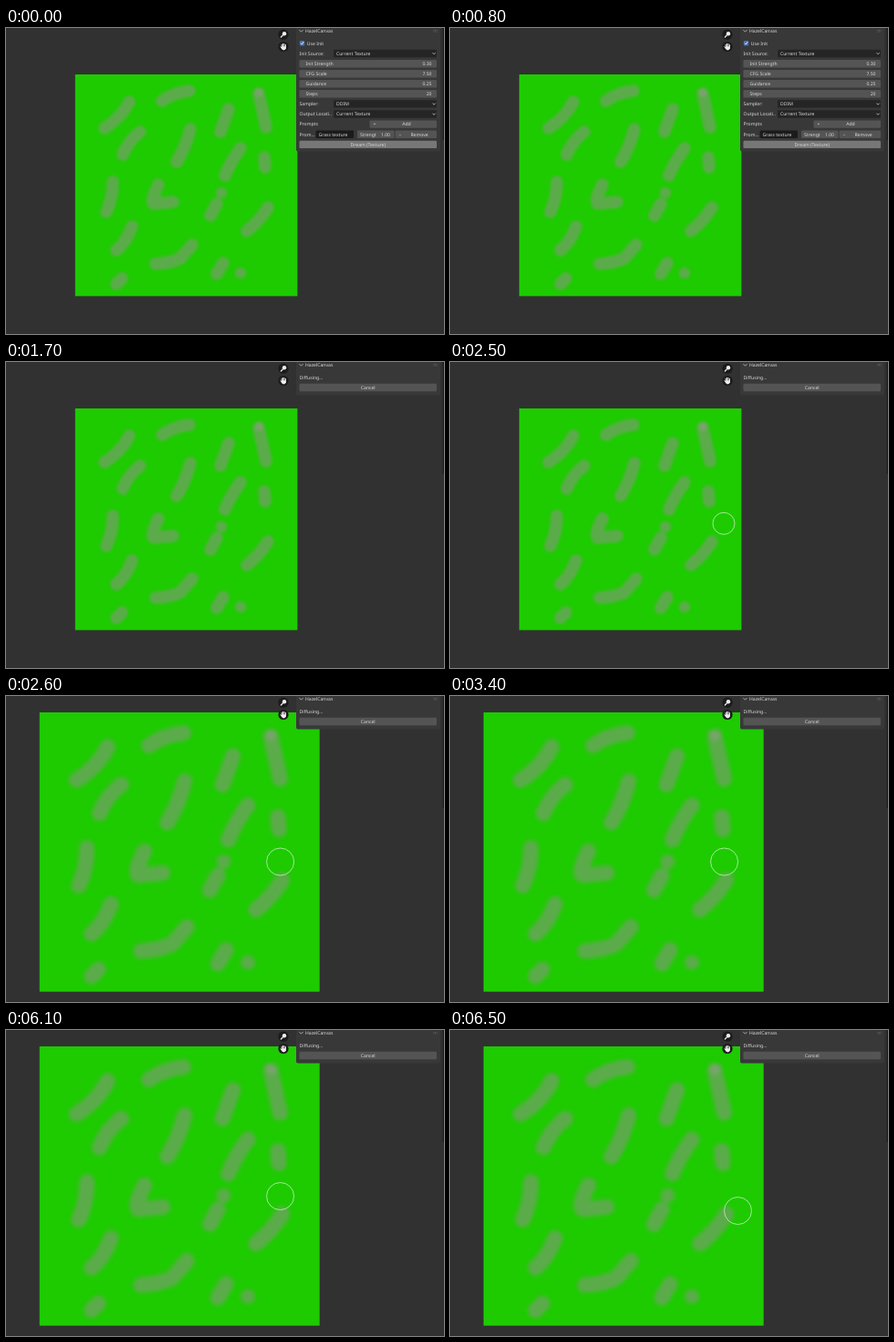
Recreate the animation shown at these times as an HTML page. Size 480x336 px, loop 8000 ms.

```html
<!DOCTYPE html>
<html lang="en">
<head>
<meta charset="utf-8">
<title>Texture panel</title>
<style>
  html, body { margin: 0; width: 100%; height: 100%; overflow: hidden; background: #313131; }
  svg { display: block; width: 480px; height: 336px; }
  text { font: 5.1px "Noto Sans", "Open Sans", sans-serif; fill: #dcdcdc; text-rendering: geometricPrecision; }
  .line { fill: none; stroke: #d0d0d0; stroke-width: .8; }
</style>
</head>
<body>
<svg viewBox="0 0 480 336">
  <defs>
    <filter id="soft" filterUnits="userSpaceOnUse" x="70" y="45" width="256" height="256">
      <feGaussianBlur stdDeviation="1.7"/>
    </filter>
  </defs>
  <rect width="480" height="336" fill="#313131"/>

  <g id="texture">
    <rect x="75.8" y="51" width="243.6" height="243.4" fill="#1dcb00"/>
    <g filter="url(#soft)" fill="none" stroke="#5cab4b" stroke-width="13.5" stroke-linecap="round" stroke-linejoin="round">
      <path d="M108 110Q127 98 135 81M171 80Q183 71 201 69M277 72L285 109M244 89L235 114
        M147 114Q134 124 128 139M202 111Q197 131 187 147M257 132Q246 147 240 162M283 142L284 153
        M117 169Q117 187 110 202M167 172Q158 190 162 193L183 191M231 193L224 206
        M287 197Q278 212 264 223M138 218Q132 235 121 244M164 259Q180 258 191 253L204 238
        M238 258L231 270M127 275L121 281"/>
      <path d="M236 181h.01M257 269h.01" stroke-width="12.5"/>
      <path d="M277 71h.01" stroke="#78a46c" stroke-width="9"/>
    </g>
  </g>

  <circle id="brush" fill="none" stroke="#c9ecc0" stroke-width=".8"/>

  <g id="tools">
    <circle cx="304" cy="7.2" r="5.6" fill="#1b1b1b"/>
    <circle cx="305" cy="6.2" r="2.2" fill="#eee"/>
    <path d="M303.3 8L301.3 10" stroke="#eee" stroke-width="1.2" stroke-linecap="round"/>
    <circle cx="304" cy="20.5" r="5.6" fill="#1b1b1b"/>
    <path d="M302.2 21V18.2M303.6 20.5V17.3M305 20.5V17.5M306.4 21V18.5M301 20.7L303 23.3" stroke="#eee" stroke-width="1" stroke-linecap="round"/>
    <path d="M301.9 20.3H306.9V22.3Q306.3 24.4 304.3 24.4Q302.8 24.2 301.9 22.5Z" fill="#eee"/>
  </g>

  <path d="M479.3 0V123" stroke="#202020" stroke-width="1.4"/>
  <g id="settings"></g>
  <g id="progress"></g>
</svg>

<script>
const $ = id => document.getElementById(id);
const LOOP = 8000;
const GRAY = '#545454', HOVER = '#777777', BLUE = '#4772b3', DARK = '#252525';

const text = (x, y, label, anchor = 'start') =>
  `<text x="${x}" y="${y + 1.8}" text-anchor="${anchor}">${label}</text>`;
const box = (x, y, right, fill, id = '') =>
  `<rect id="${id}" x="${x}" y="${y - 4.2}" width="${right - x}" height="8.4" rx="1.2" fill="${fill}"/>`;
const button = (x, y, right, label, id) =>
  box(x, y, right, GRAY, id) + text((x + right) / 2, y, label, 'middle');
const slider = (y, label, value) =>
  box(321.5, y, 472, GRAY) + text(328.5, y, label) + text(466.5, y, value, 'end');
const menu = (y, label, value) =>
  text(321.5, y, label) + box(359, y, 472, DARK) + text(362, y, value) +
  `<path class="line" d="M467.5 ${y - .8}l1.6 1.6 1.6-1.6"/>`;
const panel = bottom =>
  `<path d="M318 0H476V${bottom - 2}q0 2-2 2H320q-2 0-2-2Z" fill="#383838"/>
   <path class="line" d="M321.5 2.2l2 2 2-2"/>` + text(328, 3.5, 'HazelCanvas') +
  '<path d="M468.5 2.5h4M468.5 4h4" stroke="#777" stroke-width=".7" stroke-dasharray=".8 .8"/>';

$('settings').innerHTML = panel(135.5) +
  `<rect x="321.8" y="14" width="5.4" height="5.4" rx="1" fill="${BLUE}"/>
   <path d="M323 16.7l1.2 1.2 2-2.7" fill="none" stroke="#fff" stroke-width=".9"/>` +
  text(329.8, 16.7, 'Use Init') +
  menu(28, 'Init Source:', 'Current Texture') +
  slider(39.2, 'Init Strength', '0.30') +
  slider(50.2, 'CFG Scale', '7.50') +
  slider(61.2, 'Guidance', '0.25') +
  slider(72.2, 'Steps', '20') +
  menu(83.4, 'Sampler:', 'DDIM') +
  menu(94.5, 'Output Locati..', 'Current Texture') +
  text(321.5, 105.6, 'Prompts') + box(398.5, 105.6, 472, GRAY) +
  text(404, 105.6, '+', 'middle') + text(439, 105.6, 'Add', 'middle') +
  text(321.5, 116.8, 'Prom...') + box(339.5, 116.8, 381, '#1b1b1b') + text(342.5, 116.8, 'Grass texture') +
  box(385, 116.8, 425.5, GRAY) + text(388, 116.8, 'Strengt') + text(421, 116.8, '1.00', 'end') +
  box(426.5, 116.8, 472, GRAY) + text(432, 116.8, '−', 'middle') + text(453, 116.8, 'Remove', 'middle') +
  button(321.5, 127.9, 472, 'Dream (Texture)', 'dream');

$('progress').innerHTML = panel(36.5) +
  text(321.5, 16.7, 'Diffusing...') + button(321.5, 28, 472, 'Cancel');

const show = (id, on) => $(id).setAttribute('display', on ? 'inline' : 'none');

function brushAt(t) {
  if (t < 2500) return [361, 145];
  if (t < 2600) return [300, 177.3];
  if (t < 4200) return [300.6, 182];
  const p = Math.min(Math.max((t - 6100) / 400, 0), 1);
  const eased = p * p * (3 - 2 * p);
  return [300.6 + 14.9 * eased, 182.5 + 16 * eased];
}

function draw(now) {
  const t = Math.floor(now % LOOP / 100) * 100;
  const zoomed = t >= 2600;
  $('texture').setAttribute('transform',
    zoomed ? 'translate(226 178) scale(1.26) translate(-226 -178)' : '');
  show('settings', t < 1700);
  show('progress', t >= 1700);
  $('dream').setAttribute('fill', t >= 1500 ? BLUE : t >= 400 && t < 700 ? GRAY : HOVER);

  const [x, y] = brushAt(t);
  show('brush', t >= 2400);
  $('brush').setAttribute('cx', x);
  $('brush').setAttribute('cy', y);
  $('brush').setAttribute('r', zoomed ? 15 : 12);
}

const start = performance.now();
function tick() {
  draw(performance.now() - start);
  requestAnimationFrame(tick);
}
tick();
</script>
</body>
</html>
```
